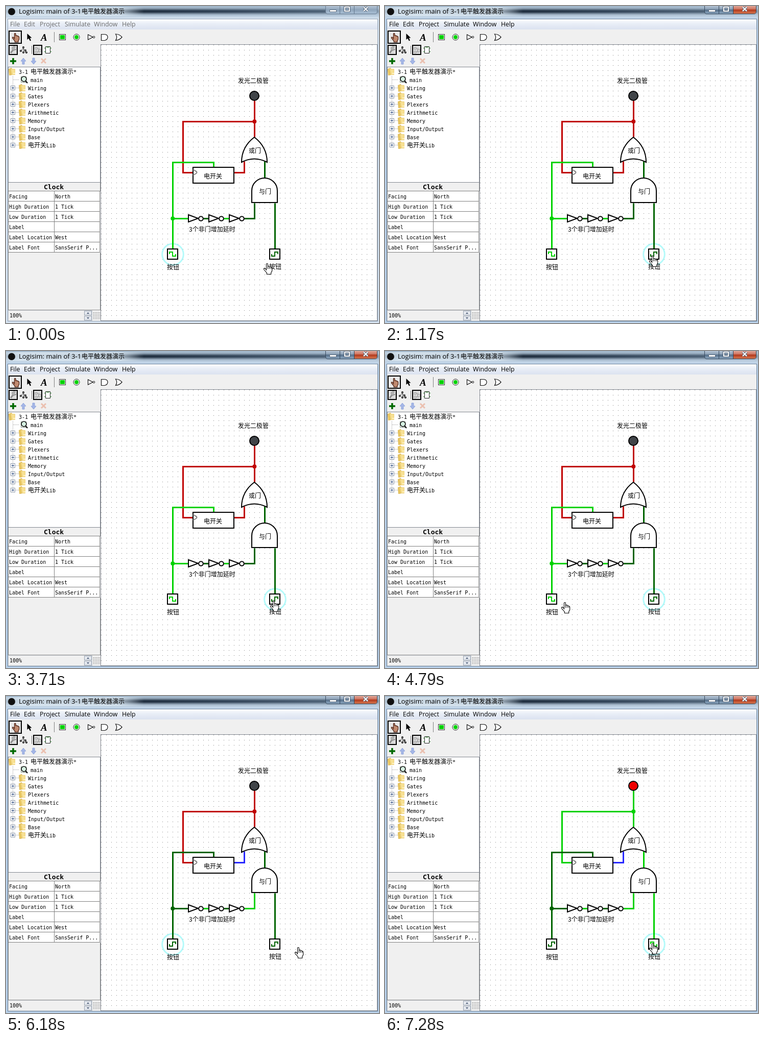
Animation of 730x621 px, one loop 8000 ms. Source, as an HTML page with a canvas:

```html
<!DOCTYPE html>
<html lang="zh">
<head>
<meta charset="utf-8">
<title>Logisim</title>
<style>
html, body { margin: 0; width: 100%; height: 100%; overflow: hidden; }
canvas { display: block; width: 730px; height: 621px; }
</style>
</head>
<body>
<canvas id="stage" width="730" height="621"></canvas>
<script>
const W = 730, H = 621, LOOP = 8000;
const HIGH = '#00d200', LOW = '#006400', FLOAT = '#2828ff', ERROR = '#c00000';
const MONO = '10px "DejaVu Sans Mono", monospace';
const UI = '12.3px "Open Sans", sans-serif';
const TITLE = '13px "Open Sans", sans-serif';
const CJK = '12px "Noto Sans CJK SC", "Noto Sans CJK", sans-serif';
const HAND = 'M5.5 13V2Q5.5 .5 7 .5T8.5 2V6Q11.5 5 11.5 7Q14.5 6 14.5 8.2Q16.7 7.6 16.7 10V15' +
  'L14.7 18.5V21.5H6.5V19L1 12.5Q-.2 10.2 1.8 9.6Q3.4 9.6 5.5 13Z';
const KNUCKLES = 'M8.5 6V11M11.5 7V11M14.5 8.5V11';

const screen = document.getElementById('stage').getContext('2d');
let c = screen;

function rect(x, y, w, h, fill) {
  c.fillStyle = fill;
  c.fillRect(x, y, w, h);
}
function frame(x, y, w, h, color, width = 1) {
  c.strokeStyle = color;
  c.lineWidth = width;
  c.strokeRect(x + width / 2, y + width / 2, w - width, h - width);
}
function shape(d, fill, stroke, width = 1, x = 0, y = 0, scale = 1) {
  const p = new Path2D(d);
  c.save();
  c.translate(x, y);
  c.scale(scale, scale);
  if (fill) { c.fillStyle = fill; c.fill(p); }
  if (stroke) { c.strokeStyle = stroke; c.lineWidth = width; c.stroke(p); }
  c.restore();
}
function disc(x, y, r, fill, stroke, width = 1) {
  c.beginPath();
  c.arc(x, y, r, 0, Math.PI * 2);
  if (fill) { c.fillStyle = fill; c.fill(); }
  if (stroke) { c.strokeStyle = stroke; c.lineWidth = width; c.stroke(); }
}
function text(s, x, y, font, color = '#000') {
  c.font = font;
  c.fillStyle = color;
  c.fillText(s, x, y);
}
function fade(x0, y0, x1, y1, ...stops) {
  const g = c.createLinearGradient(x0, y0, x1, y1);
  stops.forEach(([at, color]) => g.addColorStop(at, color));
  return g;
}

function titleBar(active) {
  rect(0, 0, W, H, active ? '#b9d1ea' : '#d7e4f2');
  rect(0, 0, W, 26, fade(0, 0, 0, 26, [0, '#9fb6cb'], [.15, '#b3c7d9'], [.75, '#bccfe1'],
    [1, active ? '#c4d8ee' : '#dbe6f2']));
  const streak = fade(0, 0, W, 0, [0, 'rgba(30,48,68,.2)'], [.3, 'rgba(24,40,58,.7)'],
    [.36, 'rgba(20,34,50,.95)'], [.6, 'rgba(24,42,62,.85)'], [.85, 'rgba(30,50,72,.7)'], [1, 'rgba(40,60,85,.3)']);
  for (let y = 1; y < 21; y++) {
    c.globalAlpha = Math.exp(-(((y - 10) / 5) ** 2));
    rect(0, y, W, 1, streak);
  }
  c.globalAlpha = 1;
  rect(0, 2, 270, 18, fade(0, 0, 270, 0, [0, 'rgba(222,234,243,.3)'], [.1, 'rgba(222,234,243,.78)'],
    [.8, 'rgba(222,234,243,.72)'], [1, 'rgba(222,234,243,0)']));
  disc(11, 11, 7, '#111');
  text('Logisim: main of 3-1', 25, 15, TITLE);
  text('电平触发器演示', 148, 15, CJK);

  const glass = active
    ? fade(0, 0, 0, 15, [0, '#b5c5d6'], [.48, '#8398ae'], [.5, '#566f89'], [1, '#8ba6c0'])
    : fade(0, 0, 0, 15, [0, '#b2c2d3'], [.5, '#8fa5bb'], [1, '#a9bfd5']);
  const red = fade(0, 0, 0, 15, [0, '#e0a698'], [.48, '#cb6b55'], [.5, '#b23a1e'], [1, '#d4744c']);
  const edge = active ? '#35475a' : '#65798e';
  shape('M.5 -1V11Q.5 15.5 5 15.5H97Q101.5 15.5 101.5 11V-1Z', glass, edge, 1, 625, 0);
  if (active) shape('M682 0H726V11Q726 15 722 15H682Z', red);
  shape('M653.5 0V15M681.5 0V15', null, edge);
  const ink = '#56667a';
  shape('M633.5 7.5H646.5V11.5H633.5Z', '#fff', ink);
  shape('M663 2H672V10H663Z', null, ink, 4);
  shape('M663 2H672V10H663Z', null, '#fff', 2);
  shape('M700 2L708 10M708 2L700 10', null, ink, 4);
  shape('M700 2L708 10M708 2L700 10', null, '#fff', 2);
}

function menuBar(active) {
  frame(3, 25, 725, 593, active ? '#6d8399' : '#93a3b5');
  rect(4, 26, 723, 591, '#f0f0f0');
  rect(4, 26, 723, 20, fade(0, 26, 0, 46, [0, '#fdfeff'], [.4, '#eaeff7'], [1, '#dbe2f0']));
  const color = active ? '#000' : '#6d6d6d';
  [['File', 8], ['Edit', 35], ['Project', 66], ['Simulate', 115], ['Window', 172], ['Help', 227]]
    .forEach(([s, x]) => text(s, x, 40, UI, color));
}

function toolBars() {
  rect(6, 49, 24, 24, '#e8e8e8');
  frame(5, 48, 26, 26, '#000', 2);
  shape(HAND, '#c08a70', '#4a2014', 1.5, 12, 53, .82);
  shape('M41.5 54V66L44.5 63.5L47 68.5L49 67.5L46.8 62.5H50.5Z', '#000');
  text('A', 68, 68, 'italic bold 19px "Liberation Serif", serif');
  rect(94, 51, 1, 20, '#808080');
  rect(104, 55, 13, 12, '#fff');
  frame(104, 55, 13, 12, '#333');
  rect(106, 57, 9, 8, HIGH);
  disc(138, 61, 6, '#fff', '#222');
  disc(138, 61, 4, HIGH);
  shape('M160.5 56V66L170 61Z', '#fff', '#111', 1.2);
  disc(172, 61, 1.8, '#fff', '#111');
  shape('M186.5 55.5H193Q199 56 199 61Q199 66 193 67.5H186.5Z', '#fff', '#111', 1.2);
  shape('M214.5 55Q222 55 227 61Q222 67 214.5 67.5Q219 61 214.5 55Z', '#fff', '#111', 1.2);

  rect(6, 77, 17, 18, '#dcdcdc');
  frame(5, 76, 18, 20, '#000', 2);
  shape('M9 92L15 85', null, '#909090', 3);
  shape('M19 80A4 4 0 1 0 20 84L17 85L15.5 82.5Z', '#b8b8b8', '#888');
  shape('M34 82L29 88M34 82L38 91M34 82L34 89', null, '#555');
  [[34, 81], [29, 88], [38, 87], [34, 91], [40, 91]].forEach(([x, y]) => disc(x, y, 1.6, '#777', '#111'));
  rect(50, 78, 1, 16, '#808080');
  rect(54, 77, 17, 18, '#dcdcdc');
  frame(53, 76, 18, 20, '#000', 2);
  shape('M57 81.5H61V85H57ZM57 88.5H61V92H57ZM64 84.5H68V90H64ZM61 83H64V90H61', null, '#999');
  shape('M77.5 79.5H86.5V92.5H77.5Z', '#fff', '#222');
  shape('M75 82.5H78M75 89.5H78M86 82.5H89M86 89.5H89M80 79V81H84V79', null, '#227722');

  shape('M14 102V114M8 108H20', null, '#006800', 3.5);
  shape('M0 -6L5 0H2V6H-2V0H-5Z', '#a4b6e6', '#8fa4dc', 1, 34, 108);
  shape('M0 6L5 0H2V-6H-2V0H-5Z', '#a4b6e6', '#8fa4dc', 1, 54, 108);
  shape('M69 103L78 112M78 103L69 112', null, '#ebc0b0', 3);
}

function folder(x, y) {
  shape('M0 2L5 0L7 2V13L1 14Z', '#e8c660', '#dcb85a', 1, x + .5, y + .5);
  shape('M4 2H12V13H6Z', '#f7e092', '#ecd07c', 1, x + .5, y + .5);
  rect(x + 9, y + 10, 4, 2, '#fff3c4');
}

function explorer() {
  rect(4, 119, 181, 227, '#fff');
  frame(4, 119, 181, 227, '#828790');
  c.setLineDash([1, 1]);
  shape('M13.5 137V272', null, '#a0a0a0');
  for (let i = 1; i < 10; i++) shape(`M14 ${128.5 + i * 16}H25`, null, '#a0a0a0');
  c.setLineDash([]);

  folder(5, 121);
  text('3-1', 25, 133, MONO);
  text('电平触发器演示', 48, 133, CJK);
  text('*', 132, 133, MONO);
  rect(28, 137, 13, 14, '#fff');
  frame(29, 138, 11, 12, '#8a9a8a');
  disc(35, 143, 5, '#d5efe0', '#111', 1.6);
  shape('M38.5 147L42 151', null, '#111', 2.4);
  text('main', 48, 149, MONO);
  ['Wiring', 'Gates', 'Plexers', 'Arithmetic', 'Memory', 'Input/Output', 'Base', ''].forEach((s, i) => {
    const y = 160 + i * 16;
    rect(9, y - 4, 9, 9, '#fff');
    frame(9, y - 4, 9, 9, '#919bab');
    rect(11, y, 5, 1, '#26457a');
    rect(13, y - 2, 1, 5, '#26457a');
    folder(25, y - 7);
    text(s, 43, y + 5, MONO);
  });
  text('电开关', 43, 277, CJK);
  text('Lib', 79, 277, MONO);
}

function attributes() {
  rect(4, 346, 1, 250, '#8c8c8c');
  rect(184, 346, 1, 250, '#8c8c8c');
  rect(4, 595, 181, 1, '#8c8c8c');
  text('Clock', 74, 359, 'bold 13px "DejaVu Sans Mono", monospace');
  rect(4, 363, 181, 120, '#fff');
  [['Facing', 'North'], ['High Duration', '1 Tick'], ['Low Duration', '1 Tick'], ['Label', ''],
    ['Label Location', 'West'], ['Label Font', 'SansSerif P...']].forEach(([name, value], i) => {
    const y = 377 + i * 20;
    text(name, 6, y, MONO);
    text(value, 96, y, MONO);
  });
  for (let y = 362; y < 483; y += 20) rect(4, y, 180, 1, '#7f7f7f');
  for (const x of [4, 94, 183]) rect(x, 362, 1, 121, '#7f7f7f');

  rect(5, 597, 148, 19, '#f0f0f0');
  frame(4, 596, 165, 21, '#d0d4da');
  text('100%', 7, 610, MONO);
  [597, 607].forEach(y => {
    rect(153, y, 15, 9, '#e4e8ee');
    frame(153, y, 15, 9, '#9aa4b2');
  });
  shape('M158 603L160.5 600L163 603ZM158 610L160.5 613L163 610Z', '#4a5a76');
  for (let x = 171; x < 184; x += 3)
    for (let y = 600; y < 614; y += 3) rect(x, y, 1, 1, '#333');
}

function grid() {
  rect(185, 75, 542, 542, '#828790');
  rect(186, 76, 540, 540, '#fff');
  for (let x = 186; x < 726; x += 10)
    for (let y = 76; y < 616; y += 10) rect(x, y, 1, 1, '#777');
}

function makeChrome(active) {
  const layer = document.createElement('canvas');
  layer.width = W;
  layer.height = H;
  c = layer.getContext('2d');
  titleBar(active);
  menuBar(active);
  toolBars();
  explorer();
  attributes();
  grid();
  c = screen;
  return layer;
}
const idleChrome = makeChrome(false), activeChrome = makeChrome(true);

// Wires are three pixels wide, so they centre on half pixels
function wire(d, color) { shape(d, null, color, 3, .5, .5); }
function part(d, x = 0, y = 0) { shape(d, '#fff', '#000', 2, x, y); }
function level(on) { return on ? HIGH : LOW; }

function clock(x, on) {
  part('M-10 -10H10V10H-10Z', x, 486);
  const s = on ? -4 : 4;
  shape(`M-6 0V${s}H0V${-s}H6V0`, null, level(on), 2, x, 486);
}

function circuit(left, right, halo) {
  const lit = !left && right;
  const out = lit ? HIGH : ERROR;
  const input = level(left), inverted = level(!left);

  disc(halo + .5, 486.5, 20.8, null, '#b4fafa', 3);

  wire('M486 185V257M486 226H346V326H367', out);
  disc(486.3, 226.3, 4, out);
  wire('M326 476V306H406V316M326 416H357', input);
  disc(326.3, 416.3, 4, input);
  wire('M386 416H397', inverted);
  wire('M426 416H437', input);
  wire('M465 416H486V386', inverted);
  wire('M446 326H466V304', left ? ERROR : FLOAT);
  wire('M506 336V304', level(lit));
  wire('M526 476V386', level(right));

  disc(486, 176, 9, lit ? '#f00000' : '#404448', '#000', 2);
  part('M486 257Q511 276 511 306Q486 293 461 306Q461 276 486 257Z');
  part('M481 385V362A25 25 0 0 1 531 362V385Z');
  part('M366 316H446V347H366Z');
  shape('M366 321Q381 326 366 331', null, '#808080', 2);
  for (let x = 357; x < 440; x += 40) {
    part('M0 -7L19 0L0 7Z', x, 416);
    disc(x + 24.5, 416.5, 4.3, '#fff', '#000', 2);
  }
  clock(326, left);
  clock(526, right);

  [['发光二极管', 454, 151], ['或门', 475, 288], ['电开关', 387, 338], ['与门', 495, 368],
    ['3个非门增加延时', 358, 442], ['按钮', 315, 516], ['按钮', 515, 515]]
    .forEach(([s, x, y]) => text(s, x, y, CJK));
}

// Each move: first step, last step, step count, end x, end y, bow
const moves = [
  [60, 530, 7, 517, 489, 0],
  [4170, 4320, 3, 382, 492, 4.5],
  [4490, 4790, 5, 345, 492, 0],
  [4880, 5190, 5, 326, 490, 0],
  [5950, 6180, 4, 565, 492, 7],
  [6350, 6580, 4, 517, 484, 0]
];
function pointer(t) {
  let x = 504, y = 504;
  for (const [from, to, n, ex, ey, bow] of moves) {
    if (t < from) break;
    const step = Math.min(n, 1 + Math.floor((t - from) / (to - from) * (n - 1) + 1e-6));
    const u = step / n;
    x += (ex - x) * u;
    y += (ey - y) * u + bow * Math.sin(Math.PI * u);
    if (u < 1) break;
  }
  return [Math.round(x), Math.round(y)];
}

const between = (t, a, b) => t >= a && t < b;

function draw(now) {
  const t = now % LOOP;
  const left = t < 5650;
  const right = between(t, 1400, 2320) || between(t, 3010, 3710) || t >= 7280;
  const halo = t < 1170 || between(t, 5570, 7050) ? 326 : 526;
  c.drawImage(t < 1170 ? idleChrome : activeChrome, 0, 0);
  circuit(left, right, halo);
  const [x, y] = pointer(t);
  shape(HAND, '#fff', '#000', 1.1, x, y);
  shape(KNUCKLES, null, '#000', 1, x, y);
}

const start = performance.now();
function tick() {
  draw(performance.now() - start);
  requestAnimationFrame(tick);
}
tick();
</script>
</body>
</html>
```
